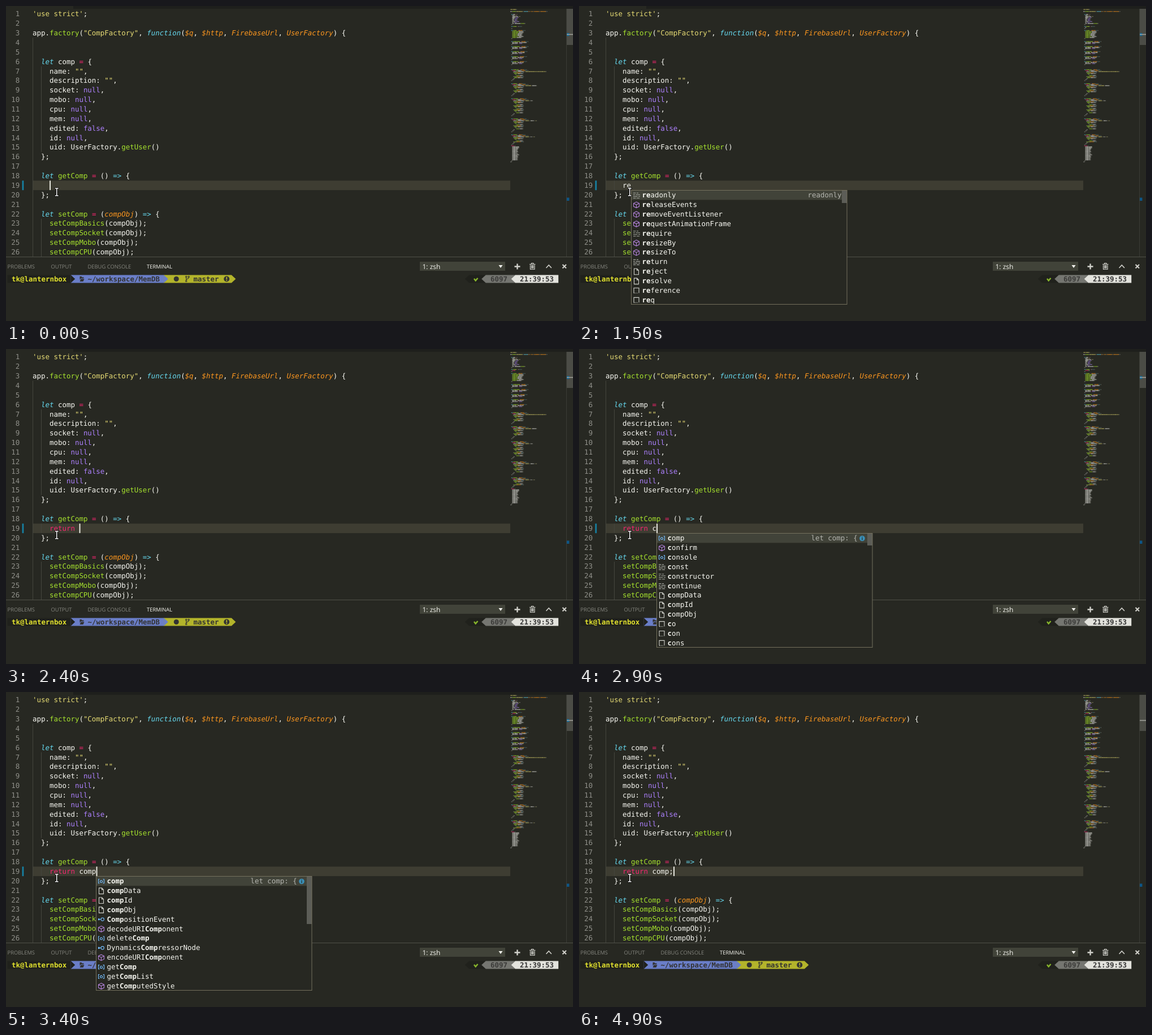
Recreate the animation shown at these times as an HTML page. Size 1003x558 px, loop 5.1 s.

```html
<!DOCTYPE html>
<html lang="en">
<head>
<meta charset="utf-8">
<title>Editor autocomplete</title>
<style>
  html, body { margin: 0; width: 100%; height: 100%; overflow: hidden; background: #272822; }
  svg { display: block; width: 100vw; height: 100vh; }
  text { white-space: pre; text-rendering: geometricPrecision; }
  .code { font: 12.45px "DejaVu Sans Mono", monospace; fill: #f8f8f2; }
  .num { fill: #90908a; text-anchor: end; }
  .bold { font-weight: bold; }
  .plain { fill: #f8f8f2; }
  .string { fill: #e6db74; }
  .keyword { fill: #66d9ef; font-style: italic; }
  .arrow { fill: #66d9ef; }
  .constant { fill: #ae81ff; }
  .operator { fill: #f92672; }
  .param { fill: #fd971f; font-style: italic; }
  .name { fill: #a6e22e; }
  .tab { font: 9.4px "Open Sans", "Noto Sans", sans-serif; fill: #85867f; }
  .tab.on { fill: #f8f8f2; }
  .dark { fill: #333; }
  .detail { fill: #b5b6b0; text-anchor: end; }
  .stroke { fill: none; stroke-width: 1.1; }
</style>
</head>
<body>
<svg viewBox="0 0 1003 558" preserveAspectRatio="none">
  <rect width="1003" height="558" fill="#272822"/>
  <rect x="119" width="884" height="5" fill="#1e1f1c"/>
  <rect x="47" y="309.3" width="845" height="16.8" fill="#3e3d32"/>
  <g id="guides" fill="#44453d"></g>
  <g id="code"></g>
  <g id="minimap"></g>

  <!-- scrollbar and overview ruler -->
  <rect x="991" y="5" width="1" height="439" fill="#3a3b35"/>
  <rect x="992" y="5" width="11" height="64" fill="#4b4c46"/>
  <rect id="rulerMark" x="992" y="48" width="4.4" height="5" fill="#0f6a9a"/>
  <rect x="992" y="49.6" width="11" height="1.6" fill="#a0a09b"/>
  <rect x="992" y="339.5" width="4.4" height="5.5" fill="#0d5687"/>
  <rect id="gutterMark" x="28.6" y="309.3" width="2.7" height="16.9" fill="#1683a5"/>

  <!-- panel -->
  <rect y="444" width="1003" height="114" fill="#272822"/>
  <rect y="444" width="1003" height="1" fill="#4f5049"/>
  <text class="tab" x="2.5" y="464.8">PROBLEMS</text>
  <text class="tab" x="79.5" y="464.8">OUTPUT</text>
  <text class="tab" x="144.5" y="464.8">DEBUG CONSOLE</text>
  <text class="tab on" x="249" y="464.8">TERMINAL</text>
  <rect x="732" y="453" width="151" height="16" fill="#414339"/>
  <text class="tab on" x="736.5" y="465.5" style="font-size:12px">1: zsh</text>
  <path d="M871.5 459h7l-3.5 5z" fill="#f8f8f2"/>
  <g fill="none" stroke="#d0d0ca">
    <path d="M899.5 461.5h10M904.5 456.5v10" stroke-width="2.4"/>
    <path d="M926 457.5h10.5M929.5 457v-1.5h3.5v1.5M927.5 458.5v8h7.5v-8M929.7 459v6M931.2 459v6M932.8 459v6" stroke-width="1.2"/>
    <path d="M955.5 464l4.7-5 4.7 5" stroke-width="1.6"/>
    <path d="M984.5 458l6.5 6.5M991 458l-6.5 6.5" stroke-width="2.1"/>
  </g>

  <!-- prompt -->
  <path d="M2.5 476.6h113v13.8h-113z" fill="#20211c"/>
  <path d="M114.7 476.6h165v13.8h-165z" fill="#6a7ec8"/>
  <path d="M114.7 476.6l7.5 6.9-7.5 6.9z" fill="#20211c"/>
  <path d="M279.3 476.6h119.6l7.5 6.9-7.5 6.9h-119.6z" fill="#b3b42b"/>
  <path d="M279.3 476.6l7.5 6.9-7.5 6.9z" fill="#6a7ec8"/>
  <text class="code bold" x="10" y="487.7" style="fill:#e2e22e">tk@lanternbox</text>
  <path class="dark" d="M130.5 479h3l1 1.5h3v2h-5l-2 2.5zM132.5 483.5h6l-2 4.5h-6z"/>
  <text class="code bold" x="144.6" y="487.7" style="fill:#333">~/workspace/MemDB</text>
  <circle class="dark" cx="301.3" cy="483.5" r="4.5"/>
  <g class="stroke" stroke="#333">
    <path d="M318.8 481v5M323.2 481c0 3-4.4 2-4.4 4.5"/>
    <circle cx="318.8" cy="479.8" r="1.2"/><circle cx="323.2" cy="479.8" r="1.2"/><circle cx="318.8" cy="487.2" r="1.2"/>
  </g>
  <text class="code bold" x="331.6" y="487.7" style="fill:#333">master</text>
  <circle class="dark" cx="390.3" cy="483.5" r="5"/>
  <path d="M389.4 480h1.8v4.3h-1.8zM389.4 485.3h1.8v1.7h-1.8z" fill="#b3b42b"/>
  <path d="M848.7 476.6h-29.4l-7.5 6.9 7.5 6.9h29.4z" fill="#20211c"/>
  <path d="M828 483l2.7 3.5 3.8-4.5" class="stroke" stroke="#86b42b" style="stroke-width:2.5"/>
  <path d="M901.7 476.6h-53l-7.5 6.9 7.5 6.9h53z" fill="#757671"/>
  <path d="M977.2 476.6h-76l-7.5 6.9 7.5 6.9h76z" fill="#e3e3dd"/>
  <text class="code bold" x="857" y="487.7" style="fill:#3b3b39">6097</text>
  <text class="code bold" x="909" y="487.7" style="fill:#333">21:39:53</text>

  <g id="live"></g>

  <!-- mouse pointer -->
  <g fill="none" stroke-linecap="square">
    <path d="M87.5 323h1.3l.9.9.9-.9h1.3M89.7 324v11M87.5 336h1.3l.9-.9.9.9h1.3" stroke="#000" stroke-width="3.2"/>
    <path d="M87.5 323h1.3l.9.9.9-.9h1.3M89.7 324v11M87.5 336h1.3l.9-.9.9.9h1.3" stroke="#fff" stroke-width="1.5"/>
  </g>
</svg>

<script>
const LEFT = 47, TOP = 5.55, COL = 7.495, ROW = 16.872, BASE = 12.74, MINI = 0.888;
const LIVE_ROW = 18, LOOP = 5100;
const $ = id => document.getElementById(id);

function add(parent, tag, attrs, content) {
  const node = document.createElementNS('http://www.w3.org/2000/svg', tag);
  for (const key in attrs) node.setAttribute(key, attrs[key]);
  if (content !== undefined) node.textContent = content;
  parent.appendChild(node);
  return node;
}

const RULES = /(["'][^"']*["'])|\b(let|function)\b|(=>)|\b(null|false)\b|\b(return)\b|(=)|(\$\w+(?=[,)])|FirebaseUrl(?=,)|UserFactory(?=\))|\w+(?=\) =>))|(\w+(?=\(| = \())/g;
const KINDS = ['string', 'keyword', 'arrow', 'constant', 'operator', 'operator', 'param', 'name'];

function tokens(line) {
  const list = [];
  let end = 0;
  for (const m of line.matchAll(RULES)) {
    if (m.index > end) list.push([line.slice(end, m.index), 'plain']);
    list.push([m[0], KINDS[m.slice(1).findIndex(Boolean)]]);
    end = m.index + m[0].length;
  }
  if (end < line.length) list.push([line.slice(end), 'plain']);
  return list;
}

function drawLine(parent, line, row) {
  const indent = line.search(/\S|$/);
  const text = add(parent, 'text', { class: 'code', x: LEFT + indent * COL, y: TOP + row * ROW + BASE });
  for (const [part, kind] of tokens(line.trimStart())) add(text, 'tspan', { class: kind }, part);
}

function drawMini(parent, line, row) {
  let col = 0;
  for (const [part, kind] of tokens(line)) {
    for (const ch of part) {
      if (ch !== ' ') add(parent, 'rect', {
        class: kind, x: 892 + col * MINI, y: 5.5 + row * 2 * MINI, width: MINI, height: 1.3,
        opacity: /\w/.test(ch) ? 0.5 + 0.1 * (ch.charCodeAt(0) % 4) : 0.35
      });
      col++;
    }
  }
}

// Document text; only the first 26 lines are in view, the rest feeds the minimap.
const parts = ['Basics', 'Socket', 'Mobo', 'CPU', 'Mem'];
const doc = `'use strict';

app.factory("CompFactory", function($q, $http, FirebaseUrl, UserFactory) {


  let comp = {
    name: "",
    description: "",
    socket: null,
    mobo: null,
    cpu: null,
    mem: null,
    edited: false,
    id: null,
    uid: UserFactory.getUser()
  };

  let getComp = () => {

  };

  let setComp = (compObj) => {`.split('\n');
for (const p of [...parts, 'Edited', 'Id']) doc.push(`    setComp${p}(compObj);`);
doc.push('  };', '', '');
for (const p of parts) {
  doc.push(`  let setComp${p} = (compObj) => {`, `    comp.${p} = compObj.${p};`, '    comp.edited = false;', '  };', '');
}
function request(name, start, rows, query) {
  while (doc.length < start) doc.push('');
  doc.push(`  let ${name} = (compId) => {`, '    return $q((resolve, reject) => {',
    `      $http.get(FirebaseUrl + "comps${query}")`);
  for (let i = 0; i < rows - 6; i++) {
    doc.push(' '.repeat(6 + 2 * (i % 4)) + ['.then((compData) => {', 'resolve(compData);', '})', 'reject(error);'][i % 4]);
  }
  doc.push('      });', '    });', '  };');
}
request('getCompList', 60, 12, '.json?orderBy=uid&equalTo=user.uid');
request('saveComp', 74, 13, '.json", compObj');
request('updateComp', 89, 18, '/" + id');
request('deleteComp', 109, 14, '/" + compId + "');
request('loadComp', 125, 11, '/" + id + "');
doc.push('  return {');
for (const p of [...parts, 'List', 'Id', 'Data', 'Edited', 'Obj', 'Name', 'Uid', 'Url', 'All']) doc.push(`    getComp${p},`);
doc.push('  };', '});');

doc.forEach((line, i) => {
  drawMini($('minimap'), line, i);
  if (i > 25) return;
  drawLine($('code'), line, i);
  add($('code'), 'text', { class: 'code num', x: 24.3, y: TOP + i * ROW + BASE }, i + 1);
});

function guide(x, from, to) {
  return add($('guides'), 'rect', { x, y: TOP + from * ROW, width: 1, height: (to - from) * ROW });
}
guide(47, 3, 26);
guide(62, 6, 15);
guide(62, 22, 26);
const liveGuide = guide(62, LIVE_ROW, LIVE_ROW + 1);

// Suggestion lists: icon letter, then label.
const reList = {
  detail: 'readonly', bar: 22,
  rows: 'k readonly|m releaseEvents|m removeEventListener|m requestAnimationFrame|k require|m resizeBy|m resizeTo|k return|f reject|f resolve|w reference|w req'
};
const retList = { detail: 'return', rows: 'k return|i PaymentRequestUpdateEvent|i XMLHttpRequestUpload' };
const returnList = { detail: 'return', rows: 'k return' };
const coList = {
  detail: 'let comp: {', info: true, bar: 21,
  rows: 'v comp|m confirm|v console|k const|k constructor|k continue|f compData|f compId|f compObj|w co|w con|w cons'
};
const compList = {
  detail: 'let comp: {', info: true, bar: 84,
  rows: 'v comp|f compData|f compId|f compObj|i CompositionEvent|m decodeURIComponent|v deleteComp|i DynamicsCompressorNode|m encodeURIComponent|v getComp|v getCompList|m getComputedStyle'
};
const LISTS = {
  r: reList, re: reList, ret: retList, retu: retList, retur: returnList, return: returnList,
  c: coList, co: coList, com: compList, comp: compList
};
const ICONS = {
  k: ['#a9aaa4', 'M0-4h4.500M6-4h3M0-1h3M4.500-1h7.500M0 2h7.500M9 2h3M0 5h4.500M6 5h5'],
  m: ['#b180d7', 'M5.5-5l5 2.5v5.5l-5 2.5-5-2.5v-5.5zM.5-2.5l5 2.5 5-2.5M5.5 0v5.5'],
  v: ['#75beff', 'M2.5-3.5h-2v7h2M8.5-3.5h2v7h-2M3.5-.5l2-1.2 2 1.2v2l-2 1-2-1z'],
  f: ['#d0d1cb', 'M1.5-5h5l3 3v7.5h-8zM6.5-5v3h3'],
  w: ['#d0d1cb', 'M1 4.5v-9h9v9M1 4.5h1.5M4 4.5h1M6.500 4.5h1'],
  i: ['#75beff', 'M0 0h5M5 0a2.7 2.7 0 1 0 5.4 0a2.7 2.7 0 1 0-5.4 0M.5-1v2h1.5v-2z']
};

function drawLabel(parent, label, query, x, y) {
  const low = label.toLowerCase();
  let i = low.indexOf(query), hit = 0;
  if (i < 0) i = low.indexOf(query.slice(0, 2));
  const text = add(parent, 'text', { class: 'code', x, y });
  [...label].forEach((ch, n) => {
    const match = n >= i && low[n] === query[hit];
    if (match) hit++;
    add(text, 'tspan', match ? { class: 'bold' } : {}, ch);
  });
}

function drawPopup(parent, query) {
  const { rows, detail, info, bar } = LISTS[query];
  const items = rows.split('|');
  const x = Math.round(LEFT + COL * ((query[0] === 'c' ? 11 : 4) + query.length)) + 0.5;
  const y = 326.5;
  const box = { x, y, width: 381.5, height: items.length * ROW - 0.5 };
  add(parent, 'rect', { ...box, fill: '#272822' });
  add(parent, 'rect', { ...box, height: ROW, fill: '#414339' });
  items.forEach((item, i) => {
    const mid = y + (i + 0.5) * ROW;
    const [color, d] = ICONS[item[0]];
    add(parent, 'path', { class: 'stroke', d, stroke: color, transform: `translate(${x + 3.5} ${mid + 0.3})` });
    drawLabel(parent, item.slice(2), query, x + 19, mid + 4.3);
  });
  add(parent, 'text', { class: 'code detail', x: x + (info ? 355.3 : 372), y: y + BASE }, detail);
  if (info) {
    add(parent, 'circle', { cx: x + 363.5, cy: y + 9, r: 4.8, fill: '#3a8fb7' });
    add(parent, 'path', { d: `M${x + 363.5} ${y + 6}v1.3m0 1v3.5`, stroke: '#272822', 'stroke-width': 1.3 });
  }
  if (bar) add(parent, 'rect', { x: x + 372.5, y: y + 0.5, width: 9, height: bar, fill: '#5c5d57' });
  add(parent, 'rect', { ...box, fill: 'none', stroke: '#75715e' });
}

// time, typed text, caret on, suggestion query
const STEPS = [
  [0, '', 1], [300, '', 0],
  [800, 'r', 1], [900, 'r', 1, 'r'], [1000, 're', 1, 'r'], [1100, 're', 1, 're'], [1500, 're', 0, 're'],
  [1600, 'ret', 1, 'ret'], [1700, 'retu', 1, 'ret'], [1800, 'retu', 1, 'retu'],
  [1900, 'retur', 1, 'retu'], [2000, 'retur', 1, 'retur'], [2100, 'return', 1, 'retur'], [2200, 'return', 1, 'return'],
  [2400, 'return ', 1], [2800, 'return c', 1], [2900, 'return c', 1, 'c'],
  [3000, 'return co', 1, 'c'], [3100, 'return co', 1, 'co'], [3200, 'return com', 1, 'com'], [3400, 'return comp', 1, 'comp'],
  [3900, 'return comp;', 1], [4000, 'return comp;', 1], [4100, 'return comp;', 1],
  [4400, 'return comp;', 0], [4900, 'return comp;', 1]
];

function render([time, typed, caret, query]) {
  const live = $('live');
  live.replaceChildren();
  const line = '    ' + typed;
  drawLine(live, line, LIVE_ROW);
  drawMini(live, line, LIVE_ROW);
  if (caret) add(live, 'rect', { x: LEFT + line.length * COL + 0.2, y: 309.3, width: 1.8, height: 16.8, fill: '#f8f8f0' });
  if (query) drawPopup(live, query);
  liveGuide.style.display = typed ? '' : 'none';
  $('gutterMark').style.display = time < 4000 ? '' : 'none';
  $('rulerMark').style.display = time < 4100 ? '' : 'none';
}

let shown;
function tick() {
  const t = performance.now() % LOOP;
  const step = STEPS.findLast(s => s[0] <= t);
  if (step !== shown) render(shown = step);
  requestAnimationFrame(tick);
}
tick();
</script>
</body>
</html>
```
